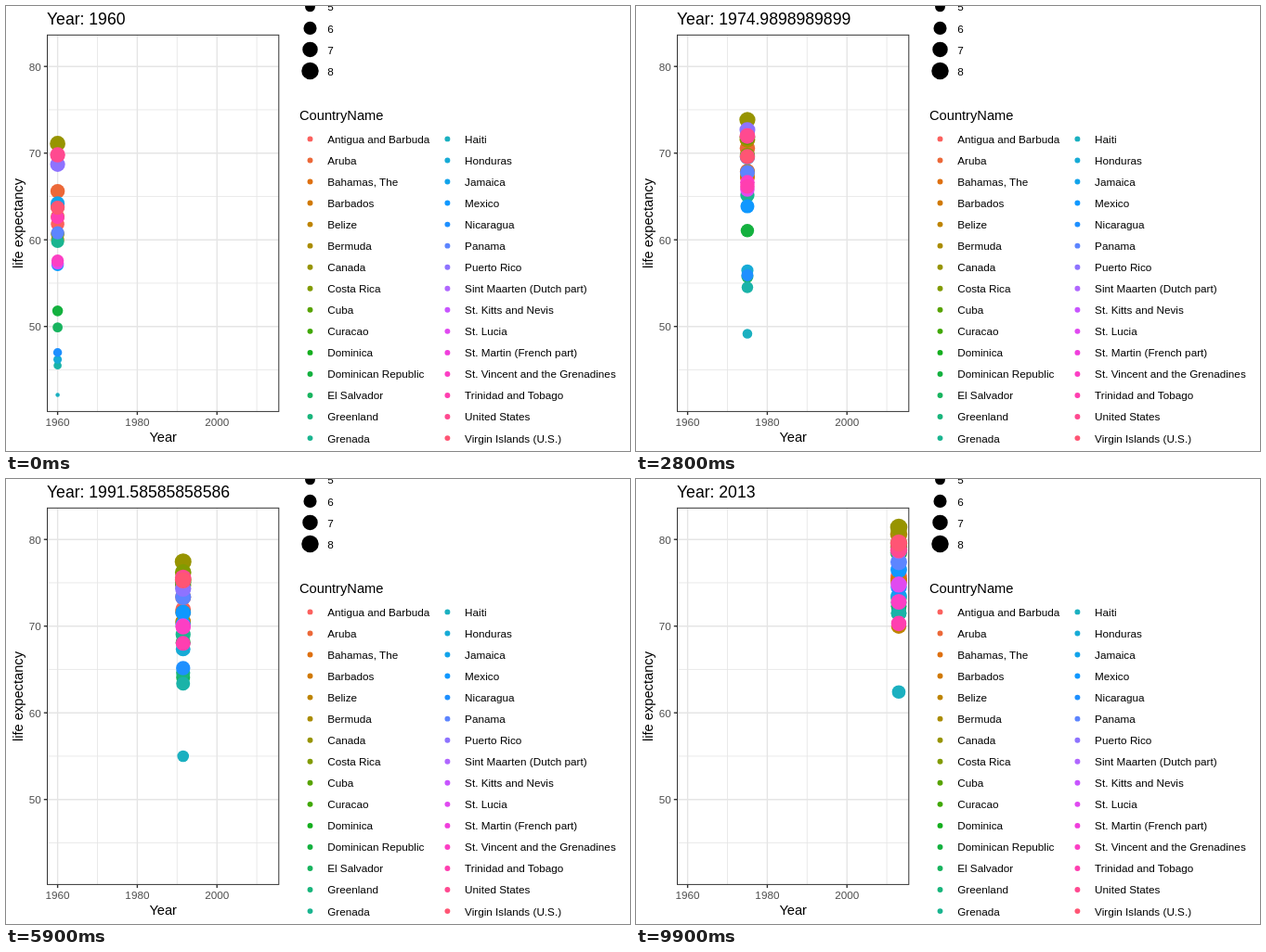
These frames come from a looping animation (672 by 480 pixels, 10000 ms). An HTML page:

```html
<!DOCTYPE html>
<html lang="en">
<head>
<meta charset="utf-8">
<title>Life expectancy by year</title>
<style>
  html, body { margin: 0; width: 100%; height: 100%; overflow: hidden; background: #fff; }
  svg { display: block; font: 11.73px "Liberation Sans", Arial, sans-serif; }
  .tick { fill: #4d4d4d; }
  .axis { font-size: 14.67px; }
  .title { font-size: 17.6px; }
</style>
</head>
<body>
<svg id="chart" width="672" height="480" viewBox="0 0 672 480"></svg>
<script>
const START = 1960, SPAN = 53, FRAMES = 100;
const KEYS = [1960, 1969, 1983, 1997, 2013];
// Name, colour, life expectancy at the key years (short lists start later).
const COUNTRIES = [
  ['Antigua and Barbuda', '#fb605d', 61.8, 66, 70, 73, 75.8],
  ['Aruba', '#ec6838', 65.6, 68.7, 72.6, 73.7, 75.5],
  ['Bahamas, The', '#de7010', 62.7, 65.7, 69, 71.5, 75.1],
  ['Barbados', '#d07800', 60.7, 65.3, 69.4, 72.8, 75.3],
  ['Belize', '#be8400', 60, 65, 70.6, 70, 70],
  ['Bermuda', '#aa8c00', 70.5, 73, 76, 80.6],
  ['Canada', '#979400', 71.1, 72.5, 75.7, 78.5, 81.4],
  ['Costa Rica', '#829b00', 60.6, 65.9, 74.2, 77, 79.6],
  ['Cuba', '#58a300', 63.8, 69.4, 74.2, 76, 79.1],
  ['Curacao', '#40a800'],
  ['Dominica', '#14ae1e', 73.5, 76, 78.5],
  ['Dominican Republic', '#14b13f', 51.8, 58, 64.6, 70, 73.2],
  ['El Salvador', '#18b45f', 49.9, 54.6, 57.6, 68, 72.3],
  ['Greenland', '#19b57c', 63.5, 65.7, 71.5],
  ['Grenada', '#1ab590', 59.8, 63.3, 67.3, 70, 72.7],
  ['Guatemala', '#1ab3a8', 45.5, 51.3, 58.6, 66.1, 71.5],
  ['Haiti', '#1bb0c0', 42.1, 46.8, 52, 56.9, 62.4],
  ['Honduras', '#17abd6', 46.2, 51.9, 62.4, 69.8, 73.5],
  ['Jamaica', '#12a3ea', 64.2, 67.9, 70.9, 70, 73.4],
  ['Mexico', '#0f98ff', 57.1, 60.9, 67.8, 73.5, 76.5],
  ['Nicaragua', '#1e90ff', 47, 53, 59.7, 68.4, 74.5],
  ['Panama', '#5d85ff', 60.8, 65, 71.1, 74.5, 77.4],
  ['Puerto Rico', '#8e73ff', 68.7, 71.2, 74.2, 74.6, 78.7],
  ['Sint Maarten (Dutch part)', '#b067ff'],
  ['St. Kitts and Nevis', '#c855ff'],
  ['St. Lucia', '#e04af0', 57.3, 62.3, 69.6, 70.2, 74.8],
  ['St. Martin (French part)', '#f03fdc'],
  ['St. Vincent and the Grenadines', '#fc3fc4', 57.6, 64.5, 68.4, 70.7, 72.8],
  ['Trinidad and Tobago', '#ff3fb0', 62.6, 65.1, 67.2, 68.5, 70.3],
  ['United States', '#ff4a90', 69.8, 70.5, 74.1, 76.4, 78.8],
  ['Virgin Islands (U.S.)', '#ff5574', 63.7, 67.3, 72.5, 76.8, 79.6]
];

const chart = document.getElementById('chart');
const xOf = year => 55.6 + (year - START) * 4.29;
const yOf = age => 65.2 + (80 - age) * 9.35;
const radius = age => 2.25 + 7.11 * Math.sqrt(Math.max(0, age - 42.1) / 39.3);

function add(tag, attrs, text) {
  const el = document.createElementNS('http://www.w3.org/2000/svg', tag);
  for (const k in attrs) el.setAttribute(k, attrs[k]);
  if (text !== undefined) el.textContent = text;
  chart.append(el);
  return el;
}
const line = (x1, y1, x2, y2, stroke, width) =>
  add('line', { x1, y1, x2, y2, stroke, 'stroke-width': width });
const label = (x, y, text, cls = '', anchor = 'start') =>
  add('text', { x, y, class: cls, 'text-anchor': anchor }, text);
const dot = (cx, cy, r, fill) => add('circle', { cx, cy, r, fill });

const LEFT = 44.5, RIGHT = 293.8, TOP = 31.3, BOTTOM = 437.4;
const gridX = (year, w) => line(xOf(year), TOP, xOf(year), BOTTOM, '#e5e5e5', w);
const gridY = (age, w) => line(LEFT, yOf(age), RIGHT, yOf(age), '#e5e5e5', w);
[1970, 1990, 2010].forEach(y => gridX(y, 0.8));
[45, 55, 65, 75].forEach(a => gridY(a, 0.8));
for (const year of [1960, 1980, 2000]) {
  gridX(year, 1.4);
  line(xOf(year), BOTTOM, xOf(year), BOTTOM + 3.7, '#333', 1.4);
  label(xOf(year), 453, year, 'tick', 'middle');
}
for (const age of [50, 60, 70, 80]) {
  gridY(age, 1.4);
  line(LEFT - 3.7, yOf(age), LEFT, yOf(age), '#333', 1.4);
  label(37.8, yOf(age) + 4.4, age, 'tick', 'end');
}

const dots = COUNTRIES.map(([, color]) => dot(0, 0, 0, color));
add('rect', { x: LEFT, y: TOP, width: RIGHT - LEFT, height: BOTTOM - TOP,
  fill: 'none', stroke: '#333', 'stroke-width': 1 });
const title = label(44, 20, '', 'title');
label(169.2, 470, 'Year', 'axis', 'middle');
label(0, 0, 'life expectancy', 'axis', 'middle')
  .setAttribute('transform', 'translate(17.7 234.5) rotate(-90)');

// Legends
const ROW = 23.05;
for (let n = 5; n <= 8; n++) {
  const y = 70 - (8 - n) * ROW;
  dot(327.5, y, radius(n * 10), '#000');
  label(346.3, y + 4.6, n);
}
label(316, 123, 'CountryName', 'axis');
COUNTRIES.forEach(([name, color], i) => {
  const x = i < 16 ? 327.5 : 475.4, y = 143.4 + (i % 16) * ROW;
  dot(x, y, 2.95, color);
  label(x + 18.7, y + 4.4, name);
});

// Each whole year falls on its nearest frame; frames between are blended.
const frameOf = year => Math.round((year - START) * (FRAMES - 1) / SPAN);
function yearAt(frame) {
  let year = START;
  while (year < START + SPAN && frameOf(year + 1) <= frame) year++;
  const from = frameOf(year);
  return year + (frame - from) / (frameOf(year + 1) - from);
}

// Smooth curve through the key values.
function ageAt(values, year) {
  const keys = KEYS.slice(KEYS.length - values.length);
  if (!values.length || year < keys[0]) return null;
  const last = keys.length - 1;
  let i = 0;
  while (i < last - 1 && year >= keys[i + 1]) i++;
  const slope = k => {
    const a = Math.max(0, k - 1), b = Math.min(last, k + 1);
    return (values[b] - values[a]) / (keys[b] - keys[a]);
  };
  const h = keys[i + 1] - keys[i], u = (year - keys[i]) / h, v = 1 - u;
  return values[i] * (1 + 2 * u) * v * v + values[i + 1] * (3 - 2 * u) * u * u
    + h * u * v * (slope(i) * v - slope(i + 1) * u);
}

function draw(now) {
  const frame = Math.floor(now / 100) % FRAMES;
  const year = yearAt(frame);
  title.textContent = 'Year: ' + Number((START + frame * SPAN / (FRAMES - 1)).toPrecision(15));
  COUNTRIES.forEach(([, , ...values], i) => {
    const age = ageAt(values, year);
    dots[i].style.display = age === null ? 'none' : '';
    if (age === null) return;
    dots[i].setAttribute('cx', xOf(year));
    dots[i].setAttribute('cy', yOf(age));
    dots[i].setAttribute('r', radius(age));
  });
}

const begin = performance.now();
function tick() {
  draw(performance.now() - begin);
  requestAnimationFrame(tick);
}
tick();
</script>
</body>
</html>
```
